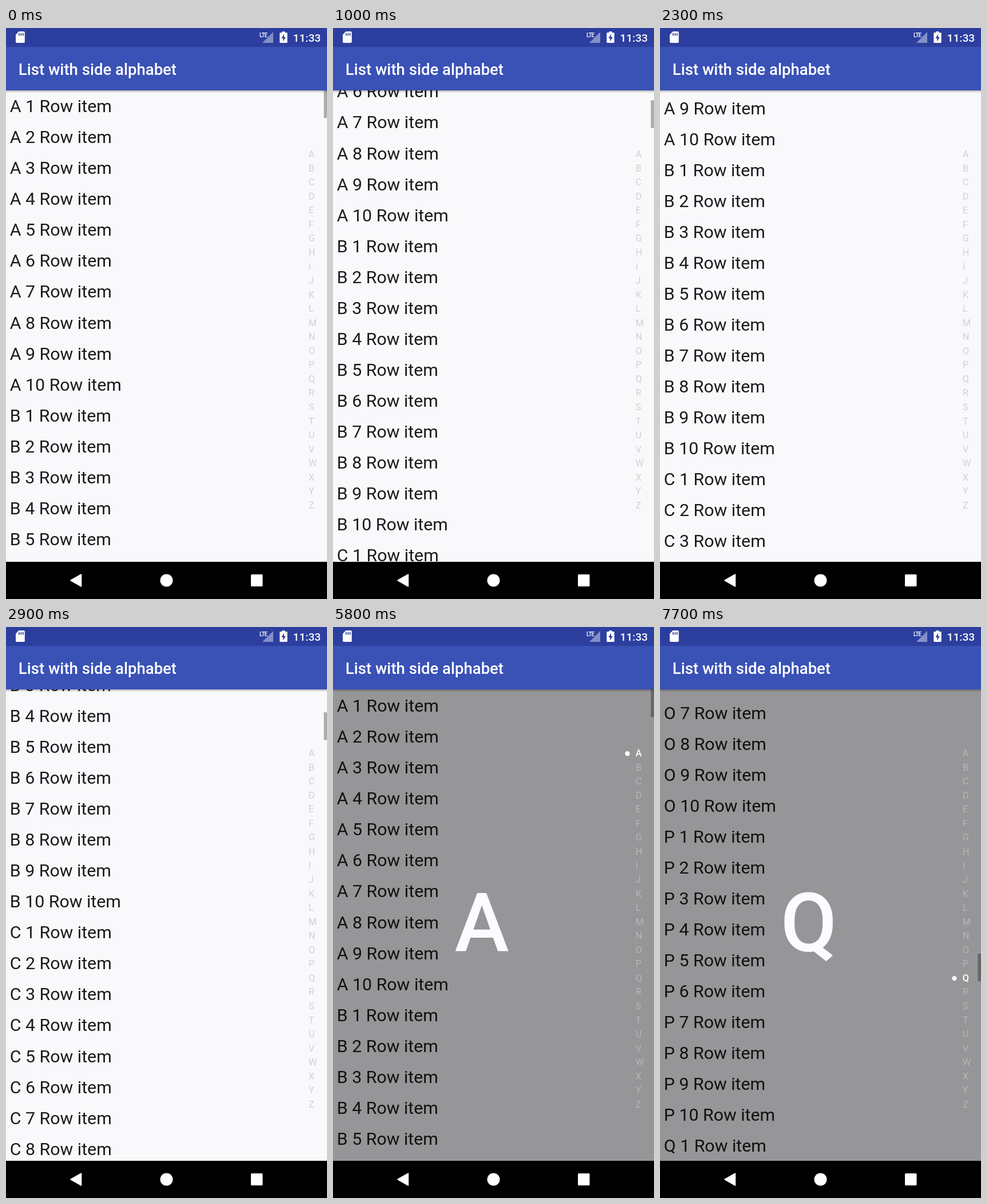
Animation, 561 px wide and 998 px high, one loop 8 s. Source, as an HTML page:

```html
<!DOCTYPE html>
<html lang="en">
<head>
<meta charset="utf-8">
<title>List with side alphabet</title>
<style>
  html, body { margin: 0; width: 100%; height: 100%; overflow: hidden; background: #000; }
  svg { display: block; width: 561px; height: 998px; font-family: Roboto, sans-serif; }
  #rows { font-size: 30.3px; fill: #1a191c; }
  #index { font-size: 16.4px; fill: #d2d1d4; }
  .dim #index { fill: #b7b5b8; }
  .dim #index .on { fill: #fff; font-weight: 500; }
  #picker { visibility: hidden; }
  .dim #picker { visibility: visible; }
  #big { font-size: 143px; font-weight: 500; text-anchor: middle; }
</style>
</head>
<body>
<svg id="stage" viewBox="0 0 561 998">
  <defs>
    <linearGradient id="shadow" x2="0" y2="1">
      <stop offset="0" stop-opacity=".32"/>
      <stop offset=".4" stop-opacity=".12"/>
      <stop offset="1" stop-opacity="0"/>
    </linearGradient>
  </defs>

  <rect width="561" height="998" fill="#f9f8fb"/>
  <g id="rows"></g>
  <rect id="bar" x="555.5" width="5.5" height="48.3" fill="#acabad"/>
  <g id="picker">
    <rect y="109" width="561" height="824" fill-opacity=".4"/>
    <g fill="#fdfbff">
      <text id="big" x="260" y="567"></text>
      <circle id="dot" cx="514.5" r="4.2"/>
    </g>
  </g>
  <g id="index"></g>

  <!-- app bar -->
  <rect y="109" width="561" height="5" fill="url(#shadow)"/>
  <rect width="561" height="109" fill="#3a51b6"/>
  <text x="21.8" y="81.5" font-size="27.5" font-weight="500" fill="#fff">List with side alphabet</text>

  <!-- status bar -->
  <rect width="561" height="33" fill="#2c3f9f"/>
  <path d="M22.5 6H31a1.8 1.8 0 0 1 1.8 1.8V24.200a1.800 1.800 0 0 1-1.800 1.800H18.800a1.800 1.800 0 0 1-1.800-1.800V11.800Z" fill="#fff"/>
  <path d="M23 9v4.500M26.400 9v4.500M29.800 9v4.500" stroke="#2c3f9f" stroke-width="1.700"/>
  <path d="M467 7V26H448Z" fill="#8490c8"/>
  <text x="443" y="15.500" font-size="10" font-weight="500" letter-spacing="-1" fill="#fff">LTE</text>
  <path d="M482.500 8V6h5v2h3a1.200 1.200 0 0 1 1.200 1.200V24.800a1.200 1.200 0 0 1-1.200 1.200h-11a1.200 1.200 0 0 1-1.200-1.200V9.200a1.200 1.200 0 0 1 1.200-1.200Z" fill="#fff"/>
  <path d="M486 10.500 481.500 18h2.800v5.500l4.500-7.500H486Z" fill="#2c3f9f"/>
  <text x="501.500" y="24" font-size="19.200" font-weight="500" fill="#fff">11:33</text>

  <!-- navigation bar -->
  <rect y="933" width="561" height="65"/>
  <g fill="#fff">
    <path d="M113 965.500 131.500 955V976Z" stroke="#fff" stroke-width="1.500" stroke-linejoin="round"/>
    <circle cx="280.500" cy="965.500" r="11"/>
    <rect x="428" y="955" width="20.500" height="21" rx="1.500"/>
  </g>
</svg>
<script>
const LOOP = 8000, TOP = 109, VIEW = 824, PITCH = 54.03;
const LETTERS = [..."ABCDEFGHIJKLMNOPQRSTUVWXYZ"];
const CONTENT = LETTERS.length * 10 * PITCH;

// Each table holds [start ms, value] steps.
const scrollSteps = [
  [0, 1], [800, 60], [900, 195], [1000, 297], [1100, 351], [1200, 389], [1300, 411],
  [1400, 423], [1500, 429], [1600, 430], [2700, 505], [2800, 622], [2900, 684.5],
  [3000, 700], [3100, 707.5], [3200, 710.2]
];
const barSteps = [
  [0, 1], [100, .75], [300, .3], [400, 0], [800, 1], [2000, .75], [2100, .5], [2200, .2],
  [2300, 0], [2700, 1], [3600, .75], [3700, .5], [3800, .2], [3900, 0], [5800, 1]
];
const pickSteps = [
  [0, ""], [5800, "A"], [6100, "B"], [6200, "D"], [6300, "E"], [6700, "F"], [6800, "G"],
  [7100, "H"], [7200, "J"], [7300, "L"], [7500, "M"], [7600, "O"], [7700, "Q"]
];

const $ = id => document.getElementById(id);
const valueAt = (steps, t) => steps.findLast(([start]) => start <= t)[1];

function addText(parent, x, y, content) {
  const node = document.createElementNS("http://www.w3.org/2000/svg", "text");
  node.setAttribute("x", x);
  node.setAttribute("y", y);
  node.textContent = content;
  parent.append(node);
  return node;
}

const indexY = i => 220.3 + i * 24.55;
const indexNodes = LETTERS.map((letter, i) => addText($("index"), 528.8, indexY(i) + 5.8, letter));
const rowNodes = Array.from({ length: 18 }, () => addText($("rows"), 6.8, 0, ""));

// A picked section scrolls just far enough to reveal its first row at the bottom.
const sectionScroll = i => Math.max(0, (i * 10 + 1) * PITCH - VIEW + 1);

function draw(t) {
  const picked = LETTERS.indexOf(valueAt(pickSteps, t));
  const scroll = picked < 0 ? valueAt(scrollSteps, t) : sectionScroll(picked);
  const first = Math.max(0, Math.floor(scroll / PITCH) - 1);

  rowNodes.forEach((node, k) => {
    const row = first + k;
    node.textContent = `${LETTERS[Math.floor(row / 10)]} ${row % 10 + 1} Row item`;
    node.setAttribute("y", 148.3 + row * PITCH - scroll);
  });

  $("bar").setAttribute("y", TOP + scroll / CONTENT * VIEW);
  $("bar").setAttribute("opacity", valueAt(barSteps, t));

  $("stage").classList.toggle("dim", picked >= 0);
  indexNodes.forEach((node, i) => node.classList.toggle("on", i === picked));
  $("big").textContent = LETTERS[picked] ?? "";
  $("dot").setAttribute("cy", indexY(Math.max(0, picked)) + 1);
}

const start = performance.now();
function tick() {
  draw((performance.now() - start) % LOOP);
  requestAnimationFrame(tick);
}
tick();
</script>
</body>
</html>
```
